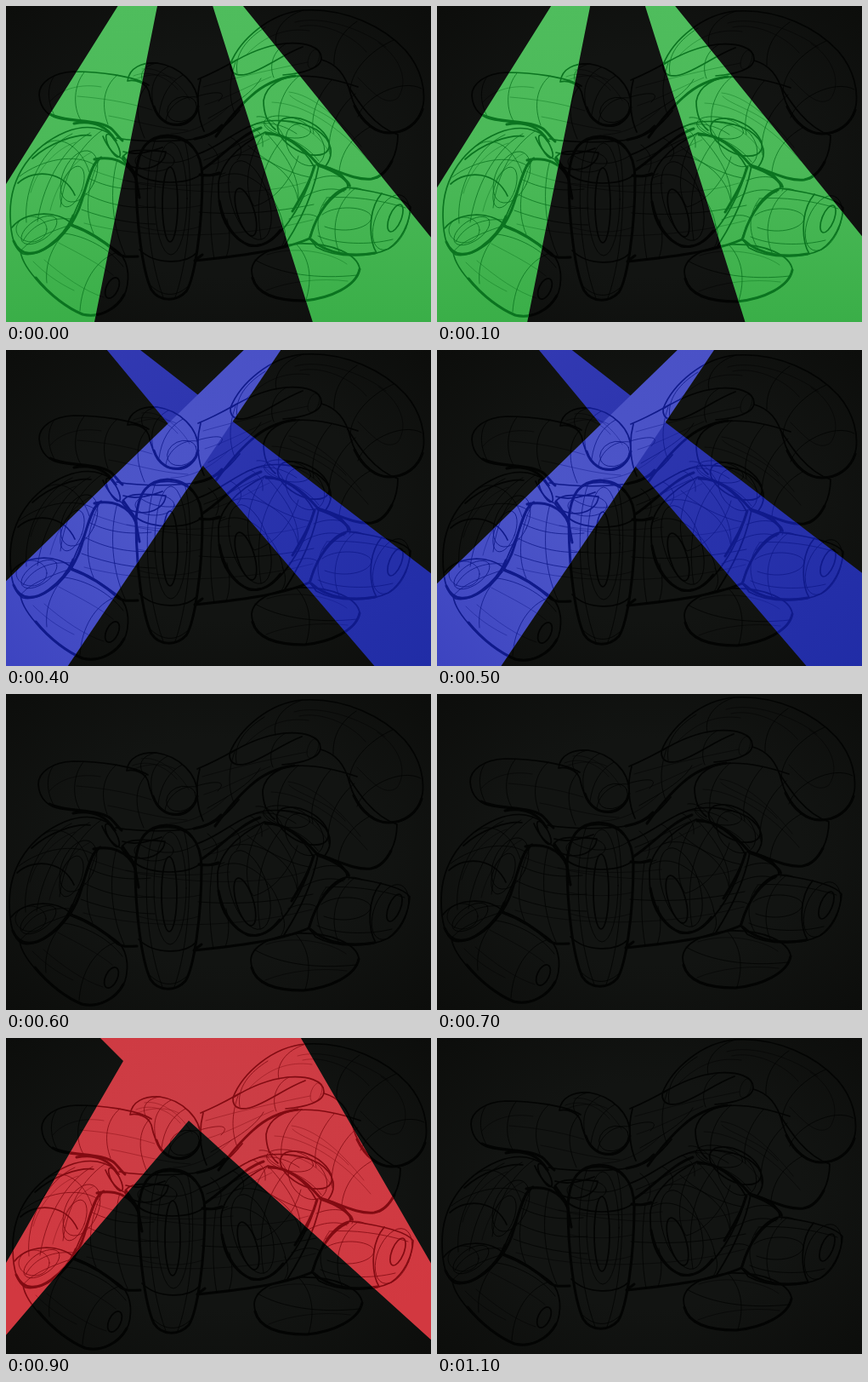
An HTML page for the animation above (1200 ms loop, 500 px wide and 371 px high).

```html
<!DOCTYPE html>
<html lang="en">
<head>
<meta charset="utf-8">
<title>Light beams over a wireframe sketch</title>
<style>
html, body { margin: 0; width: 100%; height: 100%; overflow: hidden; background: #111311; }
svg { display: block; width: 100vw; height: 100vh; }
#art path, #art ellipse { fill: none; stroke: currentColor; stroke-linecap: round; stroke-linejoin: round; }
.bold { stroke-width: 3; }
.mid { stroke-width: 1.7; }
.thin { stroke-width: .8; }
.faint { stroke-width: .7; opacity: .65; }
.dark { color: #030403; }
.shake { animation: shake 1.2s step-end infinite; }
.light { opacity: 0; animation: 1.2s step-end infinite; }
.green { color: #0b7420; animation-name: green; }
.blue { color: #101a8b; animation-name: blue; }
.red { color: #820b12; animation-name: red; }
@keyframes green { 0% { opacity: 1 } 16.66%, 100% { opacity: 0 } }
@keyframes blue { 0% { opacity: 0 } 33.33% { opacity: 1 } 50%, 100% { opacity: 0 } }
@keyframes red { 0% { opacity: 0 } 66.66% { opacity: 1 } 83.33%, 100% { opacity: 0 } }
@keyframes shake {
  0% { transform: translate(0, 0) }
  8.33% { transform: translate(2px, 1px) }
  16.66% { transform: translate(-1px, -1px) }
  25% { transform: translate(0, -1px) }
  33.33% { transform: translate(0, 0) }
  41.66% { transform: translate(2px, 1px) }
  50% { transform: translate(-1px, 2px) }
  58.33% { transform: translate(0, -1px) }
  66.66% { transform: translate(0, 0) }
  75% { transform: translate(3px, 2px) }
  83.33% { transform: translate(0, -1px) }
  91.66%, 100% { transform: translate(1px, -3px) }
}
</style>
</head>
<body>
<svg viewBox="0 0 500 371" preserveAspectRatio="none">
<defs>
  <radialGradient id="room" cx=".5" cy=".5" r=".72">
    <stop offset=".5" stop-color="#121412"/><stop offset="1" stop-color="#0c0d0b"/>
  </radialGradient>
  <linearGradient id="greenFill" x2="0" y2="1">
    <stop stop-color="#4fbd5d"/><stop offset=".5" stop-color="#4bb958"/><stop offset="1" stop-color="#39ae47"/>
  </linearGradient>
  <linearGradient id="blueFront" x1="1" x2="0" y2="1">
    <stop stop-color="#4a51c6"/><stop offset=".55" stop-color="#4c55c8"/><stop offset="1" stop-color="#3c43c0"/>
  </linearGradient>
  <linearGradient id="blueBack" x2="1" y2="1">
    <stop stop-color="#3239b2"/><stop offset="1" stop-color="#202ca6"/>
  </linearGradient>
  <radialGradient id="redFill" cx=".5" cy=".3" r=".7">
    <stop stop-color="#cb3e46"/><stop offset="1" stop-color="#d23840"/>
  </radialGradient>

  <path id="greenBeams" d="M136 -7 L179.4 -7 L102 381 L-10 381 L-10 225 Z M241 -7 L273.3 -7 L510 284 L510 381 L364 381 Z"/>
  <path id="blueA" d="M287 -7 L328 -7 L66 381 L-10 381 L-10 281 Z"/>
  <path id="blueB" d="M113 -7 L149 -7 L225 52 L510 270 L510 381 L442 381 L231 135 Z"/>
  <path id="redBeam" d="M103 -7 L341 -7 L510 285 L510 364 L212 95 L-10 355 L-10 274 L135 25 Z"/>
  <clipPath id="greenClip"><use href="#greenBeams"/></clipPath>
  <clipPath id="blueClip"><use href="#blueA"/><use href="#blueB"/></clipPath>
  <clipPath id="redClip"><use href="#redBeam"/></clipPath>

  <g id="art">
    <!-- upper left limb and blob -->
    <path class="mid" d="M168 93 C150 82 110 77 80 77 C55 78 39 90 39 104 C40 122 52 131 66 133 C90 137 118 135 128 148"/>
    <path class="bold" d="M52 127 C70 137 112 132 125 145 C130 150 133 155 137 158"/>
    <path class="thin" d="M92 78 C80 92 78 118 88 134 M131 81 C114 95 112 118 120 139 M57 82 C47 95 49 115 58 130 M166 93 C152 108 152 130 163 155"/>
    <path class="faint" d="M52 112 C65 96 90 91 112 95 M84 106 C110 108 140 112 172 122 M121 129 C150 134 180 144 214 146 M150 87 C164 80 185 78 200 86"/>
    <path class="mid" d="M143 88 C145 72 160 66 178 67 C205 71 226 92 226 115 C225 132 212 141 200 140 C180 138 172 120 168 100 C164 90 152 86 143 88"/>
    <path class="bold" d="M174 118 C179 134 192 141 204 139 C216 137 224 129 226 118"/>
    <path class="thin" d="M178 67 C157 70 155 86 166 95 M191 71 C174 80 169 95 173 115 M208 81 C192 90 183 105 180 127 M225 107 C208 104 190 118 188 135"/>
    <ellipse class="thin" cx="207" cy="121" rx="18" ry="14" transform="rotate(-25 207 121)"/>
    <path class="faint" d="M160 74 C180 70 205 90 216 110 M150 82 C170 74 190 84 202 98"/>

    <!-- shoulder band and neck -->
    <path class="mid" d="M226 86 C245 78 258 71 272 63 M229 86 C223 108 226 132 233 147"/>
    <path class="mid" d="M130 155 C160 160 200 160 228 155 C250 150 262 138 275 122"/>
    <path class="bold" d="M247 153 C258 138 271 121 288 106 C302 93 318 85 340 82 M222 156 C238 153 248 147 254 140"/>
    <path class="mid" d="M318 87 C350 76 388 86 414 95"/>
    <path class="thin" d="M270 66 C262 88 262 110 270 128 M225 106 C246 100 263 99 250 112 M238 132 C262 118 288 105 300 85"/>
    <path class="faint" d="M232 95 C270 84 310 75 355 66 M234 116 C260 108 285 94 312 83 M194 150 C220 150 245 135 262 118"/>

    <!-- upper right tubes -->
    <path class="mid" d="M264 68 C275 40 310 8 350 5 C400 2 445 25 470 52 C490 75 493 100 491 115 C487 138 470 150 450 149 C430 147 412 128 405 102 C400 82 390 68 371 63"/>
    <path class="bold" d="M410 117 C420 138 435 149 451 149 C470 149 485 137 490 121"/>
    <path class="mid" d="M264 68 C280 58 302 47 328 44 C352 42 371 48 371 61 C371 73 350 79 326 81 M264 68 C263 82 276 84 292 77 C313 68 326 57 349 48"/>
    <path class="thin" d="M350 5 C326 12 314 30 318 46 M413 18 C395 30 385 47 386 69 M456 40 C427 53 404 78 405 102 M414 130 C420 108 465 84 489 97 M305 25 C284 38 268 56 272 79 M330 44 C314 52 309 70 315 84"/>
    <ellipse class="faint" cx="362" cy="62" rx="6" ry="12" transform="rotate(20 362 62)"/>
    <path class="faint" d="M346 24 C372 18 408 34 424 54 M438 43 C463 59 475 88 461 108 C446 119 430 100 414 84 M283 57 C305 34 330 25 357 29 M340 19 C370 10 420 27 447 48"/>
    <path class="mid" d="M303 111 C306 92 325 83 345 82 M303 111 C303 126 307 137 317 145 M402 93 C414 112 433 142 461 151 C461 174 450 195 436 202"/>
    <path class="bold" d="M367 186 C388 192 410 205 430 203 C441 201 449 192 454 182"/>
    <path class="thin" d="M383 87 C367 104 357 130 362 150 M430 141 C405 154 394 174 392 194 M345 82 C327 96 319 118 321 137 M411 103 C390 120 377 148 381 174"/>
    <path class="faint" d="M333 101 C360 104 390 130 418 165 M334 105 C345 116 379 123 400 147 M313 113 C350 114 394 143 426 181"/>

    <!-- left arm -->
    <path class="mid" d="M5 243 C5 200 30 165 70 148 C95 138 118 142 130 158 M5 243 C5 265 8 285 20 291 C35 294 58 283 74 260 C80 240 95 215 104 185"/>
    <path class="bold" d="M9 276 C17 295 35 293 50 282 C65 271 75 257 79 246 M80 138 C104 133 120 143 128 157"/>
    <path class="mid" d="M14 208 C34 190 68 194 81 222 M7 260 C23 240 61 239 79 257 M31 179 C52 160 83 150 100 152"/>
    <path class="thin" d="M78 150 C44 165 20 213 24 254 M99 149 C72 163 45 202 37 253 M113 146 C87 164 69 195 64 236 M16 200 C42 180 82 172 105 187 M45 163 C65 148 90 168 98 195 M20 276 C31 255 54 248 76 250"/>
    <ellipse class="thin" cx="39" cy="263" rx="24" ry="12" transform="rotate(-34 39 263)"/>
    <ellipse class="thin" cx="30" cy="262" rx="18" ry="15"/>
    <ellipse class="thin" cx="78" cy="212" rx="12" ry="25" transform="rotate(20 78 212)"/>
    <ellipse class="thin" cx="86" cy="200" rx="19" ry="32" transform="rotate(25 86 200)"/>
    <ellipse class="mid" cx="126" cy="164" rx="5" ry="15" transform="rotate(-28 126 164)"/>
    <path class="mid" d="M114 153 C119 165 127 176 139 180"/>
    <path class="faint" d="M29 219 C37 189 62 166 82 160 M52 240 C58 215 73 186 100 172"/>

    <!-- lower left cylinder -->
    <path class="mid" d="M17 288 C20 310 55 345 85 360 C105 368 132 358 141 335 C147 315 142 295 130 287 C110 272 95 262 76 256"/>
    <path class="bold" d="M35 319 C52 340 73 355 90 362 C109 367 130 356 139 339"/>
    <path class="thin" d="M78 257 C59 274 45 297 48 325 M131 289 C105 298 89 325 87 358 M17 288 C27 274 55 264 76 257 M69 267 C93 270 121 284 138 306"/>
    <ellipse class="mid" cx="125" cy="331" rx="7" ry="13" transform="rotate(25 125 331)"/>
    <path class="faint" d="M45 298 C68 318 93 335 115 342 M62 278 C87 291 112 304 126 316 M32 300 C44 312 59 324 80 334"/>

    <!-- torso -->
    <path class="bold" d="M112 178 C102 182 96 205 89 229 C86 240 81 249 76 257 M104 180 C124 176 145 182 153 203 M76 257 C101 266 119 279 132 291 C140 296 147 294 155 294 M222 299 C270 294 323 288 357 273"/>
    <path class="thin" d="M131 180 C121 215 125 260 140 292 M110 180 C95 211 92 242 103 267 M244 198 C239 235 240 270 245 297 M260 250 C264 266 264 281 259 295 M325 255 C331 267 329 276 323 284"/>
    <path class="thin" d="M99 203 C125 216 151 216 171 214 M93 220 C124 236 155 238 176 236 M89 239 C121 251 153 256 176 256 M231 199 C240 200 250 199 258 196 M227 242 C257 244 297 246 362 233"/>
    <path class="faint" d="M100 192 C166 220 289 227 353 207 M92 255 C166 275 277 273 361 251 M142 205 C180 212 222 212 264 207"/>
    <path class="mid" d="M137 180 C138 168 160 168 188 171 C186 193 149 198 137 180 M138 171 C154 176 170 171 184 166"/>
    <ellipse class="thin" cx="175" cy="182" rx="23" ry="12"/>
    <path class="bold" d="M138 177 L152 197 M228 198 C239 200 245 198 251 196 M152 198 L157 225 M223 298 L231 292"/>

    <!-- centre capsule -->
    <path class="bold" d="M153 200 C155 165 168 153 190 152 C215 153 230 170 231 200 C231 260 222 320 212 335 C200 348 180 347 171 333 C160 310 153 250 153 200 Z"/>
    <path class="mid" d="M154 197 C169 210 216 211 231 196 M157 286 C175 304 211 304 225 289 M163 164 C177 150 208 152 219 166"/>
    <path class="thin" d="M158 174 C178 188 207 187 226 174 M176 156 C160 198 164 286 185 342 M210 157 C223 201 216 296 199 342 M168 326 C184 343 201 341 213 330"/>
    <ellipse class="mid" cx="193" cy="233" rx="9" ry="44"/>
    <ellipse class="thin" cx="194" cy="226" rx="19" ry="66"/>
    <path class="faint" d="M155 234 C178 239 207 239 230 234 M157 259 C180 266 207 266 228 259"/>

    <!-- right leg capsule and joint -->
    <path class="mid" d="M250 215 C248 190 270 165 305 148 C325 150 350 165 362 188 C358 215 335 255 318 270 C305 284 285 284 272 273 C255 258 250 240 250 215 Z"/>
    <path class="bold" d="M251 229 C256 256 269 274 286 281 C301 284 314 275 323 263 M306 150 C329 149 350 166 367 186 M231 192 C255 177 274 152 300 143"/>
    <ellipse class="mid" cx="282" cy="242" rx="10" ry="29" transform="rotate(-17 282 242)"/>
    <ellipse class="thin" cx="287" cy="228" rx="22" ry="48" transform="rotate(-17 287 228)"/>
    <path class="thin" d="M252 201 C281 185 319 217 326 257 M265 177 C299 165 344 198 344 234 M305 148 C284 174 278 216 292 235 C315 229 336 205 344 176 M327 154 C305 180 291 215 300 274 M285 164 C302 180 330 196 357 201 M306 149 C330 175 345 199 344 228"/>
    <path class="mid" d="M225 174 C248 167 270 147 290 140 C305 132 340 132 365 145 C385 158 386 175 376 188"/>
    <ellipse class="mid" cx="350" cy="153" rx="33" ry="18" transform="rotate(28 350 153)"/>
    <ellipse class="thin" cx="331" cy="142" rx="28" ry="12" transform="rotate(12 331 142)"/>
    <ellipse class="thin" cx="352" cy="163" rx="20" ry="27" transform="rotate(-37 352 163)"/>
    <path class="thin" d="M238 162 C250 171 253 182 247 194 M264 154 C276 160 281 171 272 181 M288 141 C299 147 303 153 302 165 M295 130 C308 128 321 139 329 158 M233 181 C254 174 273 161 297 151 M282 143 C300 134 321 136 342 150 M304 137 C315 154 346 153 368 182"/>
    <path class="faint" d="M240 186 C258 184 282 169 310 156 M293 139 C324 127 360 139 380 171"/>

    <!-- lower right limb and foot -->
    <path class="mid" d="M366 186 C385 190 401 198 402 212 M368 187 C362 220 346 253 328 281 M357 272 C365 247 381 217 401 213 C430 217 468 224 476 236 C475 255 465 275 450 285 C430 295 390 297 365 283 L357 272"/>
    <path class="bold" d="M363 188 C357 209 347 224 337 241 M367 187 C385 193 399 201 404 211 M358 271 C367 239 384 222 399 215 M359 274 C379 293 411 294 434 290"/>
    <path class="thin" d="M362 204 C389 193 411 204 404 216 M343 229 C360 216 384 211 398 218 M333 250 C348 243 361 243 368 249 M411 214 C387 231 381 266 393 291 M377 226 C363 244 364 269 378 287 M373 234 C387 217 404 208 420 216"/>
    <path class="mid" d="M442 220 C425 240 427 275 436 290"/>
    <ellipse class="mid" cx="458" cy="249" rx="7" ry="17" transform="rotate(22 458 249)"/>
    <ellipse class="thin" cx="453" cy="254" rx="19" ry="34" transform="rotate(22 453 254)"/>
    <path class="thin" d="M372 245 C387 233 425 235 430 247 C431 259 402 269 375 259 M377 225 C405 223 439 227 470 237 M367 270 C389 280 427 281 455 274"/>
    <path class="mid" d="M289 310 C290 295 310 282 345 279 C385 278 413 292 416 308 C415 325 390 342 350 346 C310 346 290 335 289 310 Z"/>
    <path class="bold" d="M290 319 C296 342 325 346 351 346 C382 343 412 329 416 309"/>
    <path class="thin" d="M342 280 C357 296 361 319 353 345 M293 298 C322 315 367 321 413 316 M356 273 L364 281"/>
    <path class="faint" d="M307 292 C340 281 382 289 401 303 M306 334 C333 323 370 319 402 323"/>
  </g>
</defs>

<rect width="500" height="371" fill="url(#room)"/>
<g class="shake">
  <use class="dark" href="#art"/>
  <g class="light green">
    <use href="#greenBeams" fill="url(#greenFill)"/>
    <g clip-path="url(#greenClip)"><use href="#art"/></g>
  </g>
  <g class="light blue">
    <use href="#blueB" fill="url(#blueBack)"/>
    <use href="#blueA" fill="url(#blueFront)"/>
    <g clip-path="url(#blueClip)"><use href="#art"/></g>
  </g>
  <g class="light red">
    <use href="#redBeam" fill="url(#redFill)"/>
    <g clip-path="url(#redClip)"><use href="#art"/></g>
  </g>
</g>
</svg>
</body>
</html>
```
